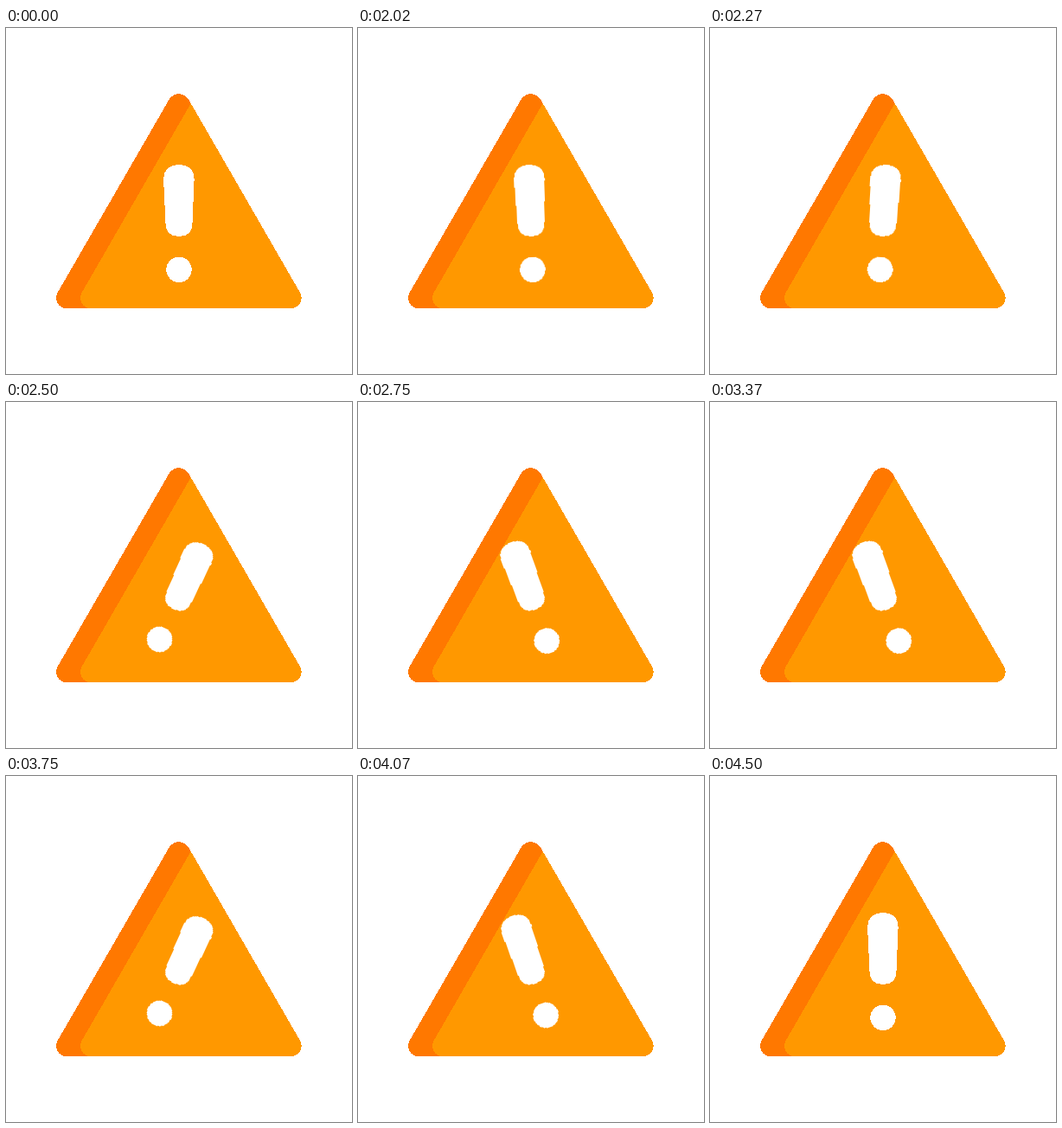
Write an HTML page that moves like this. It is 400 by 400 pixels and loops after 4.52 s.

```html
<!DOCTYPE html>
<html lang="en">
<head>
<meta charset="utf-8">
<title>Warning</title>
<style>
  html, body { margin: 0; width: 100%; height: 100%; overflow: hidden; background: #fff; }
  svg { display: block; width: 100%; height: 100%; shape-rendering: crispEdges; }
  #mark { transform-origin: 200px 225.8px; }
</style>
</head>
<body>
<svg viewBox="0 0 400 400">
  <path fill="#ff7800" d="M188.6 82.6A13.1 13.1 0 0 1 211.1 82.6L340 306A12 12 0 0 1 329.7 324H70A12 12 0 0 1 59.6 306Z"/>
  <path fill="#ff9800" d="M213.7 87.1L340 306A12 12 0 0 1 329.7 324H98A12 12 0 0 1 87.6 306Z"/>
  <g id="mark" fill="#fff">
    <path d="M182.1 174.5C181.7 165.5 188 158.4 197 158.4H203C212 158.4 218 165.5 217.6 174.5L215.4 228C215 235.5 209.5 240.6 203 240.6H197C190.5 240.6 185 235.5 184.6 228Z"/>
    <circle cx="200" cy="279.4" r="14.7"/>
  </g>
</svg>
<script>
  const LOOP = 4520, START = 2020, TICK = 25, TICKS = 100;

  // [tick, degrees]: a wobble, then a slow return to upright
  const keys = [[0, 0], [5, -20], [17.5, 30], [30, -20], [42.5, 30],
                [55, -20], [67.5, 30], [80, -20], [100, 0]];

  const ease = u => u * u * (3 - 2 * u);

  function angleAt(tick) {
    const i = keys.findIndex(([at]) => at >= tick);
    if (i < 1) return 0;
    const [t0, a0] = keys[i - 1], [t1, a1] = keys[i];
    return a0 + (a1 - a0) * ease((tick - t0) / (t1 - t0));
  }

  const pose = (ms, angle) => ({
    offset: ms / LOOP,
    transform: `rotate(${angle.toFixed(3)}deg)`,
    easing: 'step-end'
  });

  // The motion is held on a 25 ms beat, rounded up to 10 ms
  const frames = [pose(0, 0)];
  for (let n = 1; n <= TICKS; n++) {
    const ms = Math.ceil((START + (n - 1) * TICK) / 10) * 10;
    frames.push(pose(ms, angleAt(n)));
  }
  frames.push(pose(LOOP, 0));

  document.getElementById('mark').animate(frames, { duration: LOOP, iterations: Infinity });
</script>
</body>
</html>
```
